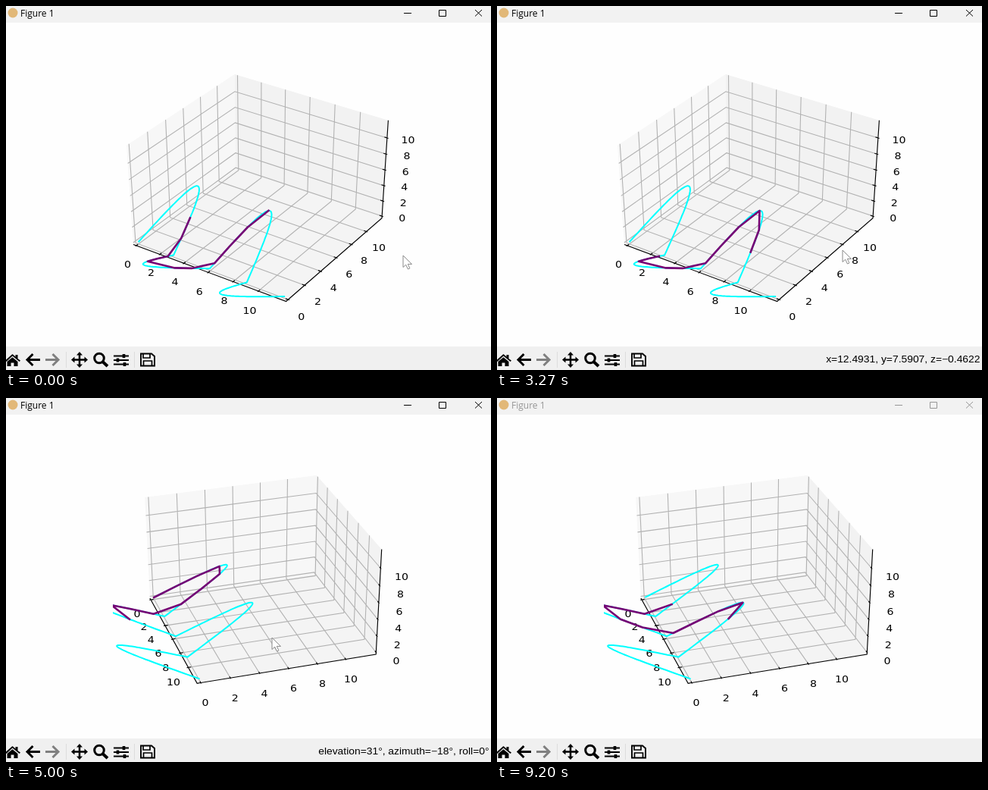
An HTML page for the animation above (9.23 s loop, 640 by 480 pixels).

```html
<!DOCTYPE html>
<html lang="en">
<head>
<meta charset="utf-8">
<style>
  html, body { margin: 0; width: 100%; height: 100%; overflow: hidden; background: #fefefe; }
  svg { display: block; width: 640px; height: 480px; }
  .tick { font: 13.9px "DejaVu Sans", sans-serif; text-anchor: middle; }
  #status { font: 13.6px "Liberation Sans", Arial, sans-serif; text-anchor: end; }
  #title text { font: 12px "Open Sans", sans-serif; fill: currentColor; }
  #title path { fill: none; stroke: currentColor; }
</style>
</head>
<body>
<svg viewBox="0 0 640 480">
  <defs>
    <clipPath id="axesClip"><rect x="141" y="74" width="377" height="329"/></clipPath>
  </defs>
  <rect width="640" height="480" fill="#fefefe"/>
  <g id="box"></g>
  <g clip-path="url(#axesClip)" fill="none">
    <path id="curve" stroke="#0ff" stroke-width="2"/>
    <path id="snake" stroke="#760074" stroke-width="2.6" stroke-linejoin="round" stroke-linecap="square"/>
  </g>

  <rect width="640" height="22" fill="#f2f2f2"/>
  <circle cx="9" cy="9" r="6.5" fill="#e2b878"/>
  <g id="title">
    <text x="19" y="13.6">Figure 1</text>
    <path d="M525 9.5h10M571.5 5.5h9v8h-9zM619 5l9 8.5M628 5l-9 8.5"/>
  </g>

  <rect y="449" width="640" height="31" fill="#f0f0f0"/>
  <path d="M79.5 456v21M169.5 456v21" stroke="#dcdcdc"/>
  <path d="M-1 467.5L8.500 459l4 3.500V460h3v5l3.500 2.500-1.300 1.500L8.500 461.500.5 469zM1.500 469l7-5.800 7 5.800v6H10.500v-4.500h-4V475h-5z"/>
  <g fill="none" stroke="#000" stroke-width="3">
    <path d="M45 466.500H28M35.500 459l-7.500 7.500 7.500 7.500"/>
    <path d="M52 466.500h17M61.500 459l7.500 7.500-7.500 7.500" stroke="#808080"/>
    <circle cx="123" cy="464.500" r="6.300"/>
    <path d="M127.500 469l6.500 6" stroke-width="4"/>
    <path d="M97 460v13M90 466.500h14" stroke-width="2.500"/>
    <path d="M142 461.500h20M142 467h20M142 472.500h20" stroke-width="1.800"/>
    <path d="M155.500 459v5M147.500 464.500v5M156.500 470v5" stroke-width="3.600"/>
    <path d="M178 458.500h14l4 3.500v12.500h-18z" stroke-width="1.900"/>
    <path d="M181 459v5h9v-5M181.500 474v-6h11v6" stroke-width="1.700"/>
  </g>
  <path d="M97 456l4 4.500h-8zM97 477l4-4.500h-8zM86 466.500l4.500-4v8zM108 466.500l-4.500-4v8z"/>
  <text id="status" transform="translate(637.500 470) scale(1.02 .89)"></text>

  <path id="cursor" d="M0 0V15.500l3.700-3.300 2.700 5.800 2.500-1.100-2.600-5.500h5.200z"
        fill="#fff" stroke="#8a8a8a" stroke-width="1"/>
</svg>
<script>
const LOOP = 9230;
const LIMIT = 11.9, LOW = -LIMIT / 48, HIGH = LIMIT - LOW;
const TICKS = [0, 2, 4, 6, 8, 10];
const LABEL_GAP = 1.03;
const DRAG_START = 3880, DRAG_END = 4720, LEAVE = 6800;
const SNAKE_POINTS = 11, SNAKE_STEPS = 15;

// time, azimuth, elevation
const VIEW_KEYS = [[DRAG_START, -56.4, 35.2], [4170, -46, 35.8], [4500, -25, 32], [4680, -17.7, 31.3]];
// time, x, y
const CURSOR_KEYS = [
  [2350, 524, 329], [3000, 456, 322], [3400, 456, 322], [DRAG_START, 431, 324], [4170, 391, 323],
  [4500, 364, 317], [4680, 351, 316], [LEAVE, 351, 316], [7400, 385, 122], [7650, 395, 60],
  [8400, 400, 26], [8600, 400, -25]
];
// curve phases of the snake's joints, about one link apart
const JOINTS = [
  0, .31, .67, 1.15, 2.1, 2.56, 2.89, 3.306, 3.64, 4.02, 5.64, 5.96, 6.37, 6.66, 7.05, 7.76,
  8.58, 8.98, 9.31, 9.65, 9.95, 10.25, 11.94, 12.27, 12.56
];

const $ = id => document.getElementById(id);
const n1 = v => v.toFixed(1);

function sample(keys, t) {
  if (t <= keys[0][0]) return keys[0].slice(1);
  for (let i = 1; i < keys.length; i++) {
    const [t1, ...b] = keys[i], [t0, ...a] = keys[i - 1];
    if (t <= t1) return a.map((v, j) => v + (b[j] - v) * (t - t0) / (t1 - t0));
  }
  return keys[keys.length - 1].slice(1);
}

function makeProjection(azimuth, elevation) {
  const a = azimuth * Math.PI / 180, e = elevation * Math.PI / 180;
  const ca = Math.cos(a), sa = Math.sin(a), ce = Math.cos(e), se = Math.sin(e);
  return ([px, py, pz]) => {
    const x = (px / LIMIT - .5) * 1.1429, y = (py / LIMIT - .5) * 1.1429, z = (pz / LIMIT - .5) * .8571;
    const depth = 10 - (ce * ca * x + ce * sa * y + se * z);
    return [
      334.2 + 2038 * (ca * y - sa * x) / depth,
      233.6 - 1778 * (ce * z - se * (ca * x + sa * y)) / depth
    ];
  };
}

function wave(phase) {
  const s = Math.sin(phase);
  return [phase * LIMIT / (4 * Math.PI), 5 * s, 4 * Math.abs(s)];
}

function line(project, points) {
  return 'M' + points.map(p => project(p).map(n1).join(' ')).join('L');
}

function drawBox(project) {
  const path = points => line(project, points);
  const A = LOW, B = HIGH, unit = LIMIT / 12, near = B - .2 * unit, far = B + .1 * unit, out = B + LABEL_GAP;
  const panes = [
    [[A, A, A], [A, B, A], [A, B, B], [A, A, B]],
    [[A, B, A], [B, B, A], [B, B, B], [A, B, B]],
    [[A, A, A], [B, A, A], [B, B, A], [A, B, A]]
  ].map((p, i) => `<path d="${path(p)}Z" fill="${['#f7f7f7', '#f2f2f2', '#f4f4f4'][i]}"/>`).join('');

  let grid = '', marks = '', labels = '';
  const label = (v, p) => {
    const [x, y] = project(p);
    labels += `<text class="tick" transform="translate(${n1(x)} ${n1(y + 9.3)}) scale(1.02 .89)">${v}</text>`;
  };
  for (const v of TICKS) {
    grid += path([[v, A, A], [v, B, A], [v, B, B]])
          + path([[B, v, A], [A, v, A], [A, v, B]])
          + path([[A, A, v], [A, B, v], [B, B, v]]);
    marks += path([[v, LIMIT - far, A], [v, LIMIT - near, A]])
           + path([[near, v, A], [far, v, A]])
           + path([[near, B, v], [far, B, v]]);
    label(v, [v, LIMIT - out, LIMIT - out]);
    label(v, [out, v, LIMIT - out]);
    label(v, [out, out, v]);
  }
  const axes = path([[A, A, A], [B, A, A], [B, B, A], [B, B, B]]);
  $('box').innerHTML = panes
    + `<path d="${grid}" fill="none" stroke="#b2b2b2" stroke-width="1.1"/>`
    + `<path d="${axes + marks}" fill="none" stroke="#000" stroke-width="1.15"/>` + labels;
}

function statusText(t, [x, y], [azimuth, elevation]) {
  const num = (v, digits) => v.toFixed(digits).replace('-', '−');
  if (t >= DRAG_START && t < LEAVE) {
    return `elevation=${num(elevation, 0)}°, azimuth=${num(azimuth, 0)}°, roll=0°`;
  }
  if (x > 518 || y < 74) return '';
  const dx = x - 456, dy = y - 322;
  return `x=${num(12.4931 + .02 * dx, 4)}, y=${num(7.5907 + .1 * dx, 4)}, z=${num(-.4622 - .03 * dy, 4)}`;
}

const phases = Array.from({ length: 241 }, (_, i) => i * Math.PI / 60);
let drawnView = '', project;

function render(t) {
  const view = sample(VIEW_KEYS, t), cursor = sample(CURSOR_KEYS, t);
  if (String(view) !== drawnView) {
    drawnView = String(view);
    project = makeProjection(...view);
    drawBox(project);
    $('curve').setAttribute('d', line(project, phases.map(wave)));
  }
  const dragging = t >= DRAG_START && t < DRAG_END;
  const tail = (Math.floor(t / 200 + .8) + 5) % SNAKE_STEPS;
  $('snake').setAttribute('d', dragging ? '' : line(project, JOINTS.slice(tail, tail + SNAKE_POINTS).map(wave)));
  $('cursor').setAttribute('transform', `translate(${cursor.map(n1)})`);
  $('status').textContent = statusText(t, cursor, view);
  $('title').style.color = t > 8750 ? '#969696' : '#000';
}

const start = performance.now();
function tick() {
  render((performance.now() - start) % LOOP);
  requestAnimationFrame(tick);
}
tick();
</script>
</body>
</html>
```
